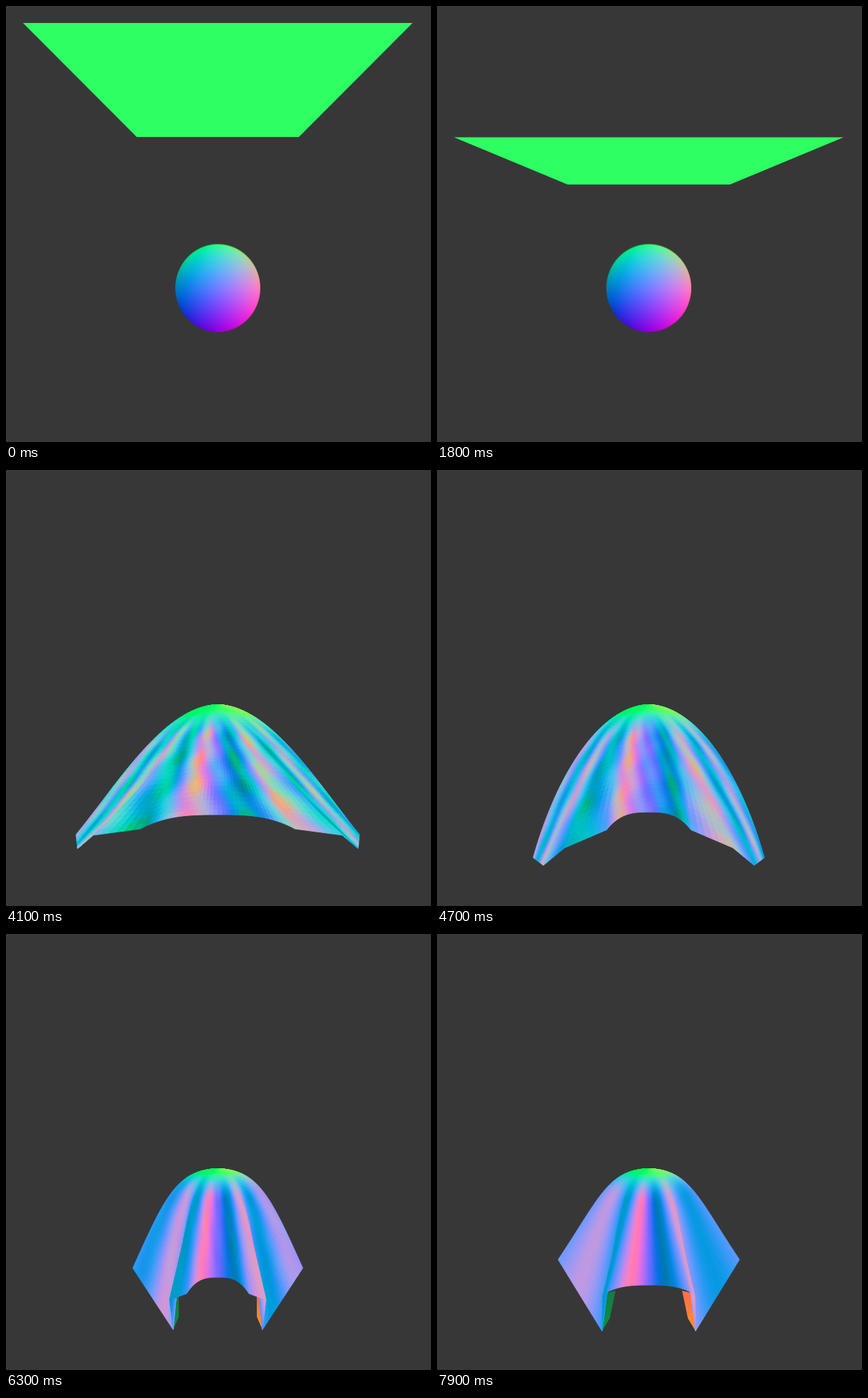
These frames come from a looping animation (600 px wide and 616 px high, 8 s). An HTML page with a canvas:

```html
<!DOCTYPE html>
<html lang="en">
<head>
<meta charset="utf-8">
<title>Cloth over a sphere</title>
<style>
html, body { margin: 0; width: 600px; height: 616px; overflow: hidden; background: #383738; }
canvas { display: block; }
</style>
</head>
<body>
<canvas id="stage" width="600" height="616"></canvas>
<script>
const ctx = document.getElementById('stage').getContext('2d');
const LOOP = 8000, STEP = 100, CX = 299, HORIZON = 300, TOUCH = 3;
const GREEN = 'rgb(46,255,98)';
const HALF = 8, SUB = 6, ROWS = 36;

const clamp = (x, a, b) => Math.max(a, Math.min(b, x));
const mix = (a, b, k) => a + (b - a) * k;
const smooth = (a, b, x) => { const k = clamp((x - a) / (b - a), 0, 1); return k * k * (3 - 2 * k); };
const mirror = ([x, y]) => [2 * CX - x, y];

// Colour of a surface whose normal points (nx right, ny up) in view space.
function shade(nx, ny) {
  const w = Math.sqrt(Math.max(0, 1 - nx * nx - ny * ny));
  const up = Math.max(ny, 0), down = Math.max(-ny, 0);
  return [
    115 + 145 * nx - 69 * up + 30 * down,
    125 + 130 * ny,
    255 - (1 - w) * (95 + 62 * up - 55 * down)
  ].map(c => Math.round(clamp(c, 0, 255)));
}

// Fall with air drag, as height above eye level.
const sheetHeight = t => 115 - 63.3 * (t - (1 - Math.exp(-1.2 * t)) / 1.2);

function sheetCorners(t) {
  const d = sheetHeight(t);
  return { back: [184.5, HORIZON - d], front: [24, HORIZON - 2.4 * d] };
}

// Left half of the hem: side, corner tip, two points of the front edge, middle.
const HEM_U = [0, 3, 4, 5, HALF];
function flatHem(t) {
  const { back, front: [x, y] } = sheetCorners(t);
  return [back, ...[0, .25, .5, 1].map(k => [mix(x, CX, k), y])];
}

// up: how far the sides face upward; amp, core, chirp: fold depth, width of
// the middle fold and how quickly folds narrow towards the sides.
const POSES = [
  { t: TOUCH, look: { spread: 30, up: 1, flat: 1, mottle: 0, flap: 0, amp: 0, core: 8, chirp: 1 },
    bend: [222, 340], hem: flatHem(TOUCH) },
  { t: 3.3, look: { spread: 25, up: .68, flat: 1, mottle: 0, flap: 0, amp: -.8, core: 8, chirp: 1 },
    bend: [262, 346], hem: flatHem(3.3) },
  { t: 3.7, look: { spread: 45, up: .65, flat: .35, mottle: .1, flap: 0, amp: .6, core: 1.4, chirp: 1.2 },
    bend: [222, 355], hem: [[160, 385], [42, 464], [100, 458], [165, 450], [299, 439]] },
  { t: 4.1, look: { spread: 75, up: .52, flat: 0, mottle: .2, flap: 0, amp: 1, core: 1.2, chirp: 1.2 },
    bend: [160, 440], hem: [[99, 515], [101, 535], [123, 516], [190, 507], [299, 487]] },
  { t: 5.4, look: { spread: 64, up: .22, flat: 0, mottle: .06, flap: 0, amp: 1, core: 2.8, chirp: 2 },
    bend: [195, 400], hem: [[188, 545], [197, 568], [237, 538], [284, 499], [299, 471]] },
  { t: 6.3, look: { spread: 58, up: .22, flat: 0, mottle: .03, flap: 13, amp: 1, core: 1.6, chirp: 1.25 },
    bend: [224, 372], hem: [[179, 472], [236, 559], [231, 517], [255, 508], [299, 485]] },
  { t: 7.9, look: { spread: 58, up: .22, flat: 0, mottle: 0, flap: 18, amp: 1, core: 1.35, chirp: 1 },
    bend: [230, 372], hem: [[171, 460], [233, 561], [234, 512], [242, 505], [299, 496]] }
];

function hermite(a, b, va, vb, span, k) {
  const k2 = k * k, k3 = k2 * k;
  return a * (2 * k3 - 3 * k2 + 1) + b * (3 * k2 - 2 * k3) +
    span * (va * (k3 - 2 * k2 + k) + vb * (k3 - k2));
}

function slope(i, get) {
  if (i === POSES.length - 1) return 0;
  const a = POSES[Math.max(0, i - 1)], b = POSES[i + 1];
  return (get(b) - get(a)) / (b.t - a.t);
}

function poseAt(t) {
  const i = clamp(POSES.findIndex(p => p.t >= t), 1, POSES.length - 1);
  const a = POSES[i - 1], b = POSES[i], span = b.t - a.t, k = (t - a.t) / span;
  const curve = get => hermite(get(a), get(b), slope(i - 1, get), slope(i, get), span, k);
  const pose = {
    bend: [0, 1].map(n => curve(p => p.bend[n])),
    hem: HEM_U.map((_, j) => [0, 1].map(n => curve(p => p.hem[j][n])))
  };
  for (const name in a.look) pose[name] = mix(a.look[name], b.look[name], k);
  return pose;
}

function polygon(points, fill, seam) {
  ctx.beginPath();
  points.forEach(([x, y]) => ctx.lineTo(x, y));
  ctx.closePath();
  ctx.fillStyle = fill;
  ctx.fill();
  if (seam) {
    ctx.strokeStyle = fill;
    ctx.lineWidth = .9;
    ctx.stroke();
  }
}

function hemPoint(pose, u) {
  const i = Math.max(1, HEM_U.findIndex(h => h >= u));
  const [a, b] = [pose.hem[i - 1], pose.hem[i]];
  const k = (u - HEM_U[i - 1]) / (HEM_U[i] - HEM_U[i - 1]);
  const rise = i === HEM_U.length - 1 ? 1 - (1 - k) ** 3 : k;
  return [mix(a[0], b[0], k), mix(a[1], b[1], rise)];
}

// u runs from the left side (0) over the middle (8) to the right side (16),
// v from the top of the sphere (0) to the hem (1).
function clothPoint(pose, u, v) {
  if (u > HALF) return mirror(clothPoint(pose, 2 * HALF - u, v));
  const side = 1 - u / HALF, r = 1 - v;
  const [hx, hy] = hemPoint(pose, u);
  const middleBend = mix(332, pose.hem[HEM_U.length - 1][1], .45);
  const bez = (a, b, c, d) => a * r * r * r + 3 * b * r * r * v + 3 * c * r * v * v + d * v * v * v;
  return [
    bez(CX, CX - pose.spread * side, mix(CX, pose.bend[0], side), hx),
    bez(331.5, 333 + 11 * (1 - side), mix(middleBend, pose.bend[1], side), hy)
  ];
}

function clothColor(pose, u, v) {
  const x = u - HALF, far = Math.abs(x), draped = 1 - pose.flat;
  const fold = smooth(.12, .5, v) * (1 - pose.flat * smooth(.45, .75, v));
  const wave = -Math.sign(x) * Math.sin(Math.PI / 2 * (far / pose.core) ** pose.chirp);
  const tilt = pose.amp * wave * (1 - .5 * (far / HALF) ** 2);
  const bumps = pose.mottle * fold;
  const facing = pose.up - .35 * draped * (1 - smooth(0, 3.5, far));
  const ny = clamp(mix(1, facing, fold) + bumps * Math.sin(u * 4.1 - v * 17), -1, 1);
  let nx = tilt * fold * Math.sqrt(1 - ny * ny);
  nx += draped * (1 - fold) * .6 * x / HALF;
  nx += bumps * Math.sin(u * 2.3 + v * 9) * Math.sin(v * 23 - u * 1.1);
  return `rgb(${shade(nx, ny)})`;
}

// Inner side of the two corners that hang below the front edge.
function drawFlaps({ flap, hem }) {
  if (flap < 1) return;
  const [, [tx, ty], [ex, ey]] = hem;
  const shape = [[tx, ty], [tx + flap * .6, ty - 18], [ex + flap, ey - 8], [ex, ey - 4]];
  const paint = (top, bottom) => {
    const g = ctx.createLinearGradient(0, ey, 0, ty);
    g.addColorStop(0, top);
    g.addColorStop(1, bottom);
    return g;
  };
  polygon(shape, paint('rgb(24,125,70)', 'rgb(0,150,60)'));
  polygon(shape.map(mirror), paint('rgb(255,112,70)', 'rgb(255,150,30)'));
}

function drawCloth(t) {
  const pose = poseAt(t);
  if (t <= 3.35) {
    const corners = pose.hem.slice(0, 2);
    polygon([...corners, ...corners.map(mirror).reverse()], GREEN);
  }
  drawFlaps(pose);
  const count = HALF * SUB;
  const strip = n => Array.from({ length: ROWS + 1 }, (_, r) => clothPoint(pose, n / SUB, r / ROWS));
  const strips = Array.from({ length: 2 * count + 1 }, (_, n) => strip(n));
  // Outside in, so that the front panel covers the sides.
  for (let n = 0; n < count; n++) {
    for (const m of [n, 2 * count - 1 - n]) {
      const a = strips[m], b = strips[m + 1];
      for (let r = 0; r < ROWS; r++) {
        polygon([a[r], b[r], b[r + 1], a[r + 1]],
          clothColor(pose, (m + .5) / SUB, (r + .5) / ROWS), true);
      }
    }
  }
}

function drawSheet(t) {
  const { back, front } = sheetCorners(t);
  polygon([front, mirror(front), mirror(back), back], GREEN);
}

function makeSphere(rx, ry) {
  const ball = document.createElement('canvas');
  ball.width = 2 * rx + 4;
  ball.height = 2 * ry + 4;
  const pen = ball.getContext('2d'), img = pen.createImageData(ball.width, ball.height);
  for (let y = 0; y < ball.height; y++) {
    for (let x = 0; x < ball.width; x++) {
      const nx = (x + .5 - ball.width / 2) / rx, ny = -(y + .5 - ball.height / 2) / ry;
      const r = Math.hypot(nx, ny), s = Math.max(1, r);
      const alpha = 255 * clamp((1 - r) * rx + .5, 0, 1);
      img.data.set([...shade(nx / s, ny / s), alpha], (y * ball.width + x) * 4);
    }
  }
  pen.putImageData(img, 0, 0);
  return ball;
}
const sphere = makeSphere(60, 62);

function draw(ms) {
  const t = Math.floor(ms % LOOP / STEP) * STEP / 1000;
  ctx.fillStyle = '#383738';
  ctx.fillRect(0, 0, 600, 616);
  ctx.drawImage(sphere, CX - sphere.width / 2, 398.5 - sphere.height / 2);
  if (t < TOUCH) drawSheet(t);
  else drawCloth(t);
}

let start;
function tick(now) {
  start ??= now;
  draw(now - start);
  requestAnimationFrame(tick);
}
draw(0);
requestAnimationFrame(tick);
</script>
</body>
</html>
```
